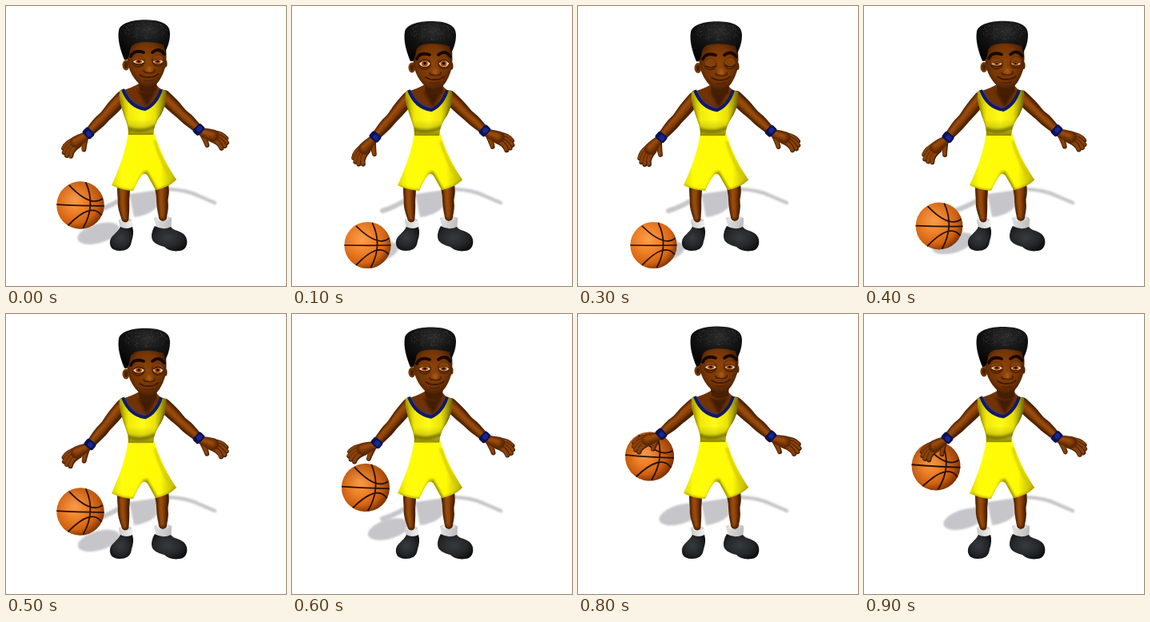
An HTML page that plays this animation: 350 by 350 pixels, repeating every 1 s.

```html
<!DOCTYPE html>
<html lang="en">
<head>
<meta charset="utf-8">
<title>Basketball dribble</title>
<style>
html, body { margin: 0; width: 100%; height: 100%; overflow: hidden; background: #fff; }
svg { display: block; width: 100vw; height: 100vh; }
</style>
</head>
<body>
<svg viewBox="0 0 350 350">
  <defs>
    <filter id="soft" x="-30%" y="-30%" width="160%" height="160%"><feGaussianBlur stdDeviation="1.8"/></filter>
    <filter id="haze" x="-30%" y="-30%" width="160%" height="160%"><feGaussianBlur stdDeviation="1.1"/></filter>
    <radialGradient id="skin" cx=".5" cy=".48" r=".6">
      <stop offset="0" stop-color="#8d4507"/><stop offset=".6" stop-color="#743504"/><stop offset="1" stop-color="#3a1802"/>
    </radialGradient>
    <radialGradient id="hair" cx=".55" cy=".25" r=".75">
      <stop offset="0" stop-color="#2b2b2b"/><stop offset=".5" stop-color="#141414"/><stop offset="1" stop-color="#050303"/>
    </radialGradient>
    <linearGradient id="shirt">
      <stop offset="0" stop-color="#a69c00"/><stop offset=".2" stop-color="#f2ea08"/>
      <stop offset=".5" stop-color="#fffb18"/><stop offset=".76" stop-color="#ebe204"/><stop offset="1" stop-color="#776e00"/>
    </linearGradient>
    <linearGradient id="waist" x2="0" y2="1">
      <stop offset=".35" stop-color="#5f5800" stop-opacity="0"/><stop offset=".75" stop-color="#5f5800" stop-opacity=".3"/>
      <stop offset="1" stop-color="#4f4900" stop-opacity=".7"/>
    </linearGradient>
    <linearGradient id="pants">
      <stop offset="0" stop-color="#e0d800"/><stop offset=".15" stop-color="#fffc08"/>
      <stop offset=".75" stop-color="#fffa04"/><stop offset="1" stop-color="#b5aa00"/>
    </linearGradient>
    <linearGradient id="sock">
      <stop offset="0" stop-color="#c9c9c9"/><stop offset=".35" stop-color="#fff"/><stop offset="1" stop-color="#bdbdbd"/>
    </linearGradient>
    <radialGradient id="shoe" cx=".45" cy=".45" r=".6">
      <stop offset="0" stop-color="#373a3e"/><stop offset=".6" stop-color="#25282b"/><stop offset="1" stop-color="#0f1011"/>
    </radialGradient>
    <radialGradient id="orange" cx=".38" cy=".38" r=".7">
      <stop offset="0" stop-color="#fba04c"/><stop offset=".35" stop-color="#f0842c"/>
      <stop offset=".72" stop-color="#d66512"/><stop offset="1" stop-color="#6b2900"/>
    </radialGradient>
    <radialGradient id="dim" cx=".42" cy=".62" r=".68">
      <stop offset=".2" stop-color="#a03a00" stop-opacity="0"/><stop offset="1" stop-color="#5d2200"/>
    </radialGradient>
    <clipPath id="shirtClip"><use href="#shirtShape"/></clipPath>
    <clipPath id="pantsClip"><use href="#pantsShape"/></clipPath>
  </defs>

  <g fill="#c6c6ca" stroke="#c6c6ca" stroke-linecap="round" filter="url(#haze)">
    <path d="M113 256Q130 251 150 238" fill="none" stroke-width="6"/>
    <path d="M154 235L190 230L188 252Q178 262 160 264Z" stroke="none"/>
    <path d="M203 229Q226 230 240 237L261 246" fill="none" stroke-width="4.500"/>
    <ellipse id="cast" rx="27" ry="12" stroke="none"/>
  </g>

  <g>
    <path d="M141 267Q149 262 157 267L158 279H143Z" fill="url(#sock)"/>
    <path d="M185 265Q196 259 207 265L206 281L189 281Z" fill="url(#sock)"/>
  </g>
  <g id="legs"></g>
  <g>
    <path d="M141 268Q149 274 157 268L158 279H143ZM185 266Q196 272 207 266L206 280H189Z" fill="url(#sock)"/>
    <path d="M143 276Q151 280 158 276C160 282 159 288 157 294C156 303 150 306 142 306C133 306 129 301 130 294C131 287 139 284 143 276Z" fill="url(#shoe)"/>
    <path d="M186 275Q196 281 206 276C209 281 216 280 222 285C228 290 228 301 221 305C212 308 203 306 198 301C190 299 182 296 182 288Q182 281 186 275Z" fill="url(#shoe)"/>
  </g>

  <g id="back"></g>
  <g id="ball">
    <circle r="30" fill="url(#orange)"/>
    <circle id="shade" r="30" fill="url(#dim)"/>
    <path d="M-30 0Q2 1 30 0M6 -29Q20 0 4 29M-15 -25Q13 3 28 -9M-15 26Q14 -5 27 12" fill="none" stroke="#24100a" stroke-width="1.8"/>
  </g>
  <g id="front"></g>
  <g id="right"></g>

  <g id="shorts">
    <path id="pantsShape" d="M153 154L184 154C187 166 194 184 202 199Q207 208 213 217Q203 227 187 230Q182 221 177 212Q174 208 170 211Q164 219 159 231Q144 230 132 224C140 206 151 180 153 154Z" fill="url(#pants)"/>
    <g clip-path="url(#pantsClip)" fill="none" filter="url(#soft)">
      <path d="M174 207L181 219L188 232" stroke="#9b9100" stroke-width="5"/>
      <path d="M160 232Q167 217 173 207" stroke="#bdb300" stroke-width="3"/>
      <path d="M151 155Q167 161 186 155" stroke="#8d8400" stroke-width="4"/>
      <path d="M133 225Q148 232 160 231M187 231Q204 227 215 216" stroke="#a49900" stroke-width="3"/>
      <path d="M186 168Q194 195 206 214" stroke="#d2c800" stroke-width="3"/>
    </g>
  </g>

  <g id="torso">
    <path d="M144 106Q158 102 166 97H187Q190 102 197 106L186 126L174 131L158 125Z" fill="#6f3304"/>
    <path d="M164 104Q177 112 189 103L176 126Z" fill="#431d02" filter="url(#soft)"/>
    <path id="shirtShape" d="M142 106L146 104Q155 126 174 130Q188 124 194 104L200 106C201 117 198 129 193 137C188 144 185 150 184 161L153 161C154 149 148 141 145 128Q141 116 142 106Z" fill="url(#shirt)"/>
    <use href="#shirtShape" style="fill:url(#waist)"/>
    <g clip-path="url(#shirtClip)" fill="none" filter="url(#soft)">
      <path d="M142 115Q147 142 153 158" stroke="#857b00" stroke-width="3"/>
      <path d="M202 108Q199 133 186 154" stroke="#6c6400" stroke-width="4"/>
      <path d="M150 152Q168 160 188 150" stroke="#8b8300" stroke-width="4"/>
    </g>
    <g clip-path="url(#shirtClip)"><rect x="140" y="130" width="62" height="32" fill="url(#waist)"/></g>
    <path d="M146 104Q154 126 174 129Q188 123 194 104" fill="none" stroke="#101a68" stroke-width="4"/>
    <path d="M149 106Q157 123 174 126" fill="none" stroke="#2837a0" stroke-width="1"/>
  </g>

  <g id="head">
    <path d="M165 90H189L188 105Q178 112 167 105Z" fill="#461f03"/>
    <ellipse cx="150" cy="74" rx="4.500" ry="6.500" fill="#7a3805"/>
    <ellipse cx="150" cy="74" rx="2" ry="4" fill="#4a2003"/>
    <ellipse cx="199.500" cy="72" rx="2" ry="4.500" fill="#552503"/>
    <path d="M152 46C162 38 191 38 199 46Q202 64 199 77C195 89 190 100 179 101C168 101 162 94 157 85C151 74 150 60 152 46Z" fill="url(#skin)"/>
    <g id="curls">
      <path d="M148 66C143 54 139 40 141 29C143 20 158 16 173 16C192 16 205 20 205 33C205 43 202 50 199 56L197 47Q181 42 164 45Q156 47 155 54Q154 62 151 66Z" fill="url(#hair)"/>
      <g id="specks" fill="#777"></g>
    </g>
    <g fill="#512402">
      <ellipse cx="165.500" cy="69.500" rx="8.500" ry="7.500"/><ellipse cx="190" cy="68.500" rx="8" ry="7.500"/>
    </g>
    <g fill="#854008">
      <ellipse cx="165.500" cy="68.500" rx="7.300" ry="6.300"/><ellipse cx="190" cy="67.500" rx="6.800" ry="6.300"/>
    </g>
    <path d="M156 63Q160 54 172 58M183 58Q191 51 198 60" fill="none" stroke="#160902" stroke-width="3.800" stroke-linecap="round"/>
    <path d="M159.500 71Q166 76 172 71M184 70Q190 75 196 70" fill="none" stroke="#2c1002" stroke-width="1.200"/>
    <g id="eyes">
      <g fill="#ecd0b4"><ellipse cx="166" rx="6.500" ry="4.200"/><ellipse cx="190" rx="6" ry="4.200"/></g>
      <g fill="#b04f0a"><circle cx="166" r="3.900"/><circle cx="189.500" r="3.900"/></g>
      <g fill="#1b0800"><circle cx="166" r="1.900"/><circle cx="189.500" r="1.900"/></g>
      <path d="M159.500 -1Q166 -8 172.500 -1M184 -1Q190 -8 196 -1" fill="none" stroke="#2c1002" stroke-width="1.300"/>
    </g>
    <ellipse cx="179" cy="79" rx="3.500" ry="4" fill="#a55812" filter="url(#soft)"/>
    <path d="M172 80Q172 84 177 83Q180 85 183 83Q187 83 186 79" fill="none" stroke="#471d02" stroke-width="1.500"/>
    <path d="M167 86Q173 90 178 89Q184 90 190 85" fill="none" stroke="#3a1502" stroke-width="1.600" stroke-linecap="round"/>
    <path d="M172 93Q179 95 185 92" fill="none" stroke="#552403" stroke-width="1.500"/>
  </g>
</svg>
<script>
const $ = id => document.getElementById(id);
const rad = a => a * Math.PI / 180;
const polar = (x, y, a, d) => [x + Math.cos(rad(a)) * d, y + Math.sin(rad(a)) * d];
const mix = (p, q, k) => p + (q - p) * k;

// Smooth outline around a chain of [x, y, radius]
function outline(pts) {
  const left = [], right = [];
  pts.forEach(([x, y, r], i) => {
    const a = pts[Math.max(0, i - 1)], b = pts[Math.min(pts.length - 1, i + 1)];
    const len = Math.hypot(b[0] - a[0], b[1] - a[1]);
    const nx = (a[1] - b[1]) / len * r, ny = (b[0] - a[0]) / len * r;
    left.push([x + nx, y + ny]);
    right.unshift([x - nx, y - ny]);
  });
  const f = n => n.toFixed(1);
  const side = s => s.slice(1, -1).map((p, i) => {
    const n = s[i + 2], end = i === s.length - 3;
    return `Q${f(p[0])} ${f(p[1])} ${f(end ? n[0] : (p[0] + n[0]) / 2)} ${f(end ? n[1] : (p[1] + n[1]) / 2)}`;
  }).join("");
  const tip = pts[pts.length - 1][2], root = pts[0][2];
  return `M${f(left[0][0])} ${f(left[0][1])}${side(left)}A${tip} ${tip} 0 0 0 ${f(right[0][0])} ${f(right[0][1])}` +
    `${side(right)}A${root} ${root} 0 0 0 ${f(left[0][0])} ${f(left[0][1])}Z`;
}

function limb(pts, dark = "#4c2203") {
  const inner = pts.map(([x, y, r]) => [x - r * .12, y - r * .14, r * .62]);
  const core = pts.map(([x, y, r]) => [x - r * .2, y - r * .25, r * .25]);
  return `<path d="${outline(pts)}" fill="${dark}"/><g filter="url(#haze)">` +
    `<path d="${outline(inner)}" fill="#843d06"/><path d="${outline(core)}" fill="#9a4e10"/></g>`;
}

function finger(from, mid, tip, r) {
  const pts = [[...from, r], [...mid, r], [...tip, r * .8]];
  const inner = pts.map(([x, y, q]) => [x - .4, y - .5, q * .65]);
  return `<path d="${outline(pts)}" fill="#4c2203"/><path d="${outline(inner)}" fill="#884109"/>`;
}

// dir: 1 for the hand on the left of the picture, -1 for the other
function hand(x, y, a, len, dir) {
  let s = finger([x, y], polar(x, y, a - 35 * dir, len * .3), polar(x, y, a - 40 * dir, len * .5), 3.6);
  const palm = polar(x, y, a + 8 * dir, len * .42);
  [11, 3, -5, -13].forEach((o, i) => {
    const base = polar(x, y, a + (o * 1.2 + 6) * dir, len * .4);
    const mid = polar(x, y, a + (o + 10) * dir, len * .72);
    s += finger(base, mid, polar(x, y, a + o * dir, len * (i % 3 ? .94 : .88)), 3.8);
  });
  return s + limb([[x, y, 5], [mix(x, palm[0], .5), mix(y, palm[1], .5), 7], [...palm, 7.6]], "#5c2904");
}

function arm(sh, wr, a, len, dir) {
  const at = (k, sag, r) => [mix(sh[0], wr[0], k), mix(sh[1], wr[1], k) + sag, r];
  const slope = Math.atan2(wr[1] - sh[1], wr[0] - sh[0]) * 180 / Math.PI;
  const [hx, hy] = polar(...wr, slope, 4);
  return hand(hx, hy, a, len, dir) +
    limb([[...sh, 8.5], at(.28, 0, 8.8), at(.52, 1, 6.8), at(.7, 0, 8), [...wr, 5.4]]) +
    `<g transform="translate(${wr}) rotate(${slope})"><rect x="-5" y="-7" width="10" height="14" rx="3" fill="#0b1250"/>` +
    `<rect x="-3" y="-4.500" width="6" height="7" rx="2" fill="#182690"/></g>`;
}

// ball x, ball y, head drop, wrist x, wrist y, hand angle, hand length, eye opening
const poses = [
  [93, 249, 0, 103, 159, 139, 37, .7],
  [94.5, 299, 3, 104, 163.5, 125, 38, 1],
  [95, 306, 4, 104, 165, 122, 38, .5],
  [94.5, 299, 3.5, 104, 164, 125, 38, 0],
  [94, 275, 2.5, 105, 164, 134, 38, .5],
  [93, 247, 1, 105, 163, 145, 37, .85],
  [92, 217, -1, 106, 161, 154, 37, .7],
  [91, 188, -2, 105, 157, 175, 37, .7],
  [89.5, 178, -3, 104, 150, 154, 36, .7],
  [90, 190, -2, 104, 155, 142, 36, .7]
];

$("legs").innerHTML =
  limb([[147, 222, 8], [147, 234, 8], [147, 242, 7], [147, 252, 7.5], [149, 266, 4.5]]) +
  limb([[194, 222, 9], [196, 234, 8.5], [195, 242, 7], [196, 252, 7.5], [196, 264, 5]]);

let seed = 7;
const rnd = () => (seed = seed * 16807 % 2147483647) / 2147483647;
let dots = "";
for (let i = 0; i < 150; i++) {
  const a = rnd() * 6.283, d = Math.sqrt(rnd());
  dots += `<circle cx="${174 + Math.cos(a) * d * 28}" cy="${29 + Math.sin(a) * d * 11}" r=".45" opacity="${.25 + rnd() * .5}"/>`;
}
$("specks").innerHTML = dots;

function draw(step) {
  const [bx, by, drop, wx, wy, angle, len, open] = poses[step];
  const sink = drop * .35, high = 299 - by;
  const put = (id, v) => $(id).setAttribute("transform", v);
  put("ball", `translate(${bx} ${by}) rotate(${high * .03}) scale(${.97 + high * .0004})`);
  $("shade").setAttribute("opacity", Math.max(0, Math.min(.55, high * .005)));
  put("cast", `translate(${107 + high * .17} ${308 - high * .475}) rotate(-16)`);
  put("head", `translate(0 ${drop})`);
  put("curls", `translate(0 ${1.2 - drop * .4})`);
  put("torso", `translate(0 ${sink})`);
  put("shorts", `translate(0 ${228 * sink / 72}) scale(1 ${1 - sink / 72})`);
  put("eyes", `translate(0 ${70.5 - open * 1.8}) scale(1 ${Math.max(.01, open)})`);
  const left = arm([146, 114 + sink], [wx, wy], angle, len, 1);
  $("back").innerHTML = step === 7 ? left : "";
  $("front").innerHTML = step === 7 ? "" : left;
  $("right").innerHTML = arm([197, 113 + sink], [241, 154.5 + drop * .5], 26 + drop * .8, 37, -1);
}

let shown = -1;
function tick() {
  const step = Math.floor(performance.now() / 100) % poses.length;
  if (step !== shown) draw(shown = step);
  requestAnimationFrame(tick);
}
tick();
</script>
</body>
</html>
```
